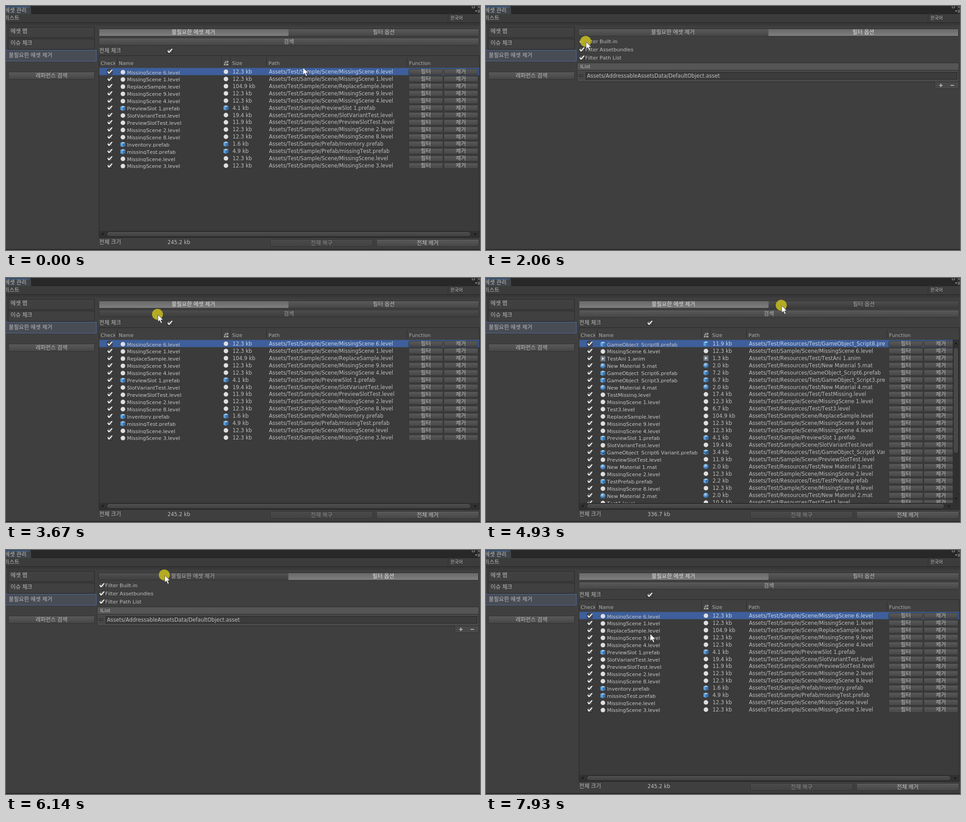
Write an HTML page that moves like this. It is 1042 px wide and 538 px high and loops after 8000 ms.

```html
<!DOCTYPE html>
<html lang="ko">
<head>
<meta charset="utf-8">
<title>Asset cleaner</title>
<style>
html, body { margin: 0; width: 100%; height: 100%; overflow: hidden; background: #3f3f3f; }
svg { display: block; }
text { font: 11.4px "DejaVu Sans", sans-serif; font-kerning: none; fill: #bdbdbd; white-space: pre; }
.ko { font: 12.1px "Noto Sans CJK KR", "Noto Sans CJK", sans-serif; }
.mid { text-anchor: middle; }
.name { font-size: 11.2px; fill: #c6c6c6; }
.head { font-size: 11px; fill: #b0b0b0; }
.opt { font-size: 11.1px; }
.small { font-size: 9.8px; }
.sel { fill: #cbd6ea; }
.on { fill: #e2e2e2; }
.dim { fill: #848484; }
.track { animation: 8s step-end infinite; }
</style>
</head>
<body>
<svg id="stage" width="1042" height="538" viewBox="0 0 1042 538">
  <defs>
    <linearGradient id="btn" x2="0" y2="1"><stop stop-color="#5a5a5a"/><stop offset="1" stop-color="#464646"/></linearGradient>
    <linearGradient id="act" x2="0" y2="1"><stop stop-color="#696969"/><stop offset="1" stop-color="#7e7e7e"/></linearGradient>
    <linearGradient id="off" x2="0" y2="1"><stop stop-color="#4a4a4a"/><stop offset="1" stop-color="#424242"/></linearGradient>
    <linearGradient id="bar" x2="0" y2="1"><stop stop-color="#505050"/><stop offset="1" stop-color="#404040"/></linearGradient>
    <radialGradient id="ball" cx=".4" cy=".3" r=".7"><stop stop-color="#b9dcf5"/><stop offset=".5" stop-color="#5b93c8"/><stop offset="1" stop-color="#2c5a8c"/></radialGradient>
    <g id="tick">
      <rect x="-5.5" y="-5.5" width="11" height="11" rx="1.5" fill="#505050" stroke="#282828"/>
      <path d="M-4.5 -.5L-1.5 3L5.5 -4.5" fill="none" stroke="#f0f0f0" stroke-width="2.3"/>
    </g>
    <circle id="s" r="5" fill="#dedede"/>
    <g id="p">
      <path d="M-5.5 -3.5L0 -5.5L5.5 -3.5L0 -1.5z" fill="#a3d0f2"/>
      <path d="M-5.5 -3.5L0 -1.5V6L-5.5 3.5z" fill="#5f9fd8"/>
      <path d="M5.5 -3.5L0 -1.5V6L5.5 3.5z" fill="#3a74b2"/>
    </g>
    <g id="v"><use href="#p"/><path d="M-5.5 -1L0 3L5.5 -1" fill="none" stroke="#26496f" stroke-width="1.6"/></g>
    <circle id="m" r="6" fill="url(#ball)"/>
    <g id="a"><rect x="-5.5" y="-6" width="11" height="12" fill="#777f88" stroke="#4e545a"/><path d="M-2 -3L3 0L-2 3z" fill="#eee"/></g>
  </defs>
</svg>
<script>
const LOOP = 8000;
const EXT = { s: 'level', p: 'prefab', v: 'prefab', m: 'mat', a: 'anim' };
const DIR = { S: 'Sample/Scene/', s: 'Sample/', P: 'Sample/Prefab/', R: 'Resources/Test/', r: 'Resources/' };

// kind + folder, name, size
const SHORT = `sS,MissingScene 6,12.3;sS,MissingScene 1,12.3;sS,ReplaceSample,104.9;sS,MissingScene 9,12.3;
sS,MissingScene 4,12.3;ps,PreviewSlot 1,4.1;sS,SlotVariantTest,19.4;sS,PreviewSlotTest,11.9;sS,MissingScene 2,12.3;
sS,MissingScene 8,12.3;pP,Inventory,1.6;pP,missingTest,4.9;sS,MissingScene,12.3;sS,MissingScene 3,12.3`;
const LONG = `pR,GameObject_Script8,11.9;sS,MissingScene 6,12.3;aR,TestAni 1,1.3;mR,New Material 5,2.0;
pr,GameObject_Script6,7.2;pR,GameObject_Script3,6.7;mR,New Material 4,2.0;sR,TestMissing,17.4;sS,MissingScene 1,12.3;
sR,Test3,6.7;sS,ReplaceSample,104.9;sS,MissingScene 9,12.3;sS,MissingScene 4,12.3;ps,PreviewSlot 1,4.1;
sS,SlotVariantTest,19.4;vR,GameObject_Script6 Variant,3.4;sS,PreviewSlotTest,11.9;mR,New Material 1,2.0;
sS,MissingScene 2,12.3;pR,TestPrefab,2.2;sS,MissingScene 8,12.3;mR,New Material 2,2.0;sR,Test1,10.5`;

const text = (x, y, s, cls = '') => `<text x="${x}" y="${y}" class="${cls}">${s}</text>`;
const ko = (x, y, s, cls = '') => text(x, y, s, 'ko ' + cls);
const rect = (x, y, w, h, fill, more = '') => `<rect x="${x}" y="${y}" width="${w}" height="${h}" fill="${fill}" ${more}/>`;
const box = (x, y, w, h, fill, line, r = 0) => rect(x + .5, y + .5, w - 1, h - 1, fill, `stroke="${line}" rx="${r}"`);
const use = (id, x, y) => `<use href="#${id}" x="${x}" y="${y}"/>`;
const path = (d, more) => `<path d="${d}" ${more}/>`;
const clip = (x, y, w, h, body) => `<svg x="${x}" y="${y}" width="${w}" height="${h}" viewBox="${x} ${y} ${w} ${h}">${body}</svg>`;
const group = (id, body) => `<g id="${id}" class="track">${body}</g>`;
const button = (x, y, w, h, label, fill = 'url(#btn)', cls = '') =>
  box(x, y, w, h, fill, '#323232', 2) + ko(x + w / 2, y + h / 2 + 4, label, 'mid ' + cls);

function chrome() {
  return rect(0, 0, 1042, 538, '#3f3f3f')
    + rect(0, 0, 1042, 18, '#282828')
    + path('M0 1H52L55 4V18H0z', 'fill="#41454a"') + rect(0, 1, 53, 1.5, '#3b70ad')
    + ko(-3, 14, '에셋 관리')
    + rect(0, 18, 1042, 18, '#3c3c3c') + rect(0, 36, 1042, 1.5, '#262626') + rect(0, 38, 1042, 5, '#383838')
    + ko(-4, 31, '리스트')
    + rect(971, 18, 1, 18, '#2d2d2d') + ko(977, 30, '한국어', 'small')
    + path('M1025 0V4H1030V0M1037 0L1042 5M1042 0L1037 5M1037 9H1042M1037 11.5H1042M1037 14H1042', 'fill="none" stroke="#aaa"')
    + path('M1031 10H1036L1033.5 13z', 'fill="#aaa"')
    + box(4, 46, 191, 24, '#404040', '#262626') + ko(10, 60, '에셋 맵')
    + box(4, 72, 191, 24, '#404040', '#262626') + ko(10, 86, '이슈 체크')
    + box(-1, 97, 200, 25, '#474c55', '#4d6a9c') + ko(6, 113, '불필요한 에셋 제거')
    + button(5, 145, 190, 17, '레퍼런스 검색')
    + rect(0, 536, 1042, 2, '#2b2626');
}

function tabs(x, active) {
  const cls = i => 'mid ' + (i === active ? 'on' : '');
  return box(x, 50, 836, 17, 'url(#btn)', '#323232', 2)
    + rect(x + 1 + active * 417, 51, active ? 417 : 416, 15, 'url(#act)')
    + ko(x + 208, 62.3, '불필요한 에셋 제거', cls(0)) + ko(x + 626.5, 62.3, '필터 옵션', cls(1));
}

function rows(data, right) {
  return data.split(';').map((line, i) => {
    const [key, name, size] = line.trim().split(',');
    const file = name + '.' + EXT[key[0]];
    const y = 145 + i * 15.92, cls = i ? '' : 'sel';
    return (i ? '' : rect(205, 136.5, right - 205, 16, '#3e5f9b'))
      + use('tick', 228, y)
      + use(key[0], 257, y + 1) + clip(264, y - 7, 208, 14, text(266, y + 5.5, file, 'name'))
      + use(key[0], 483.5, y)
      + text(498, y + 4, size + ' kb', cls)
      + clip(578, y - 8, 299, 16, text(578, y + 4, 'Assets/Test/' + DIR[key[1]] + file, cls))
      + button(885, y - 6.5, 76, 13.5, '필터') + button(962, y - 6.5, 76, 13.5, '제거');
  }).join('');
}

function list(id, data, right, total) {
  const tall = right < 1040;
  return group(id, clip(204, 136, right - 204, 360, rows(data, right))
    + rect(205, 496, 835, 14, '#303030')
    + box(221, 497, right - 239, 12, 'url(#bar)', '#252525', 6)
    + path(`M214 500V506L210 503zM${right - 10} 500V506L${right - 6} 503z`, 'fill="#161616"')
    + (tall ? rect(1026, 136, 14, 360, '#303030') + box(1027, 153, 12, 234, '#484848', '#252525', 6)
      + path('M1030 146H1036L1033 142zM1030 485H1036L1033 489z', 'fill="#161616"') : '')
    + text(355, 525, total + ' kb'));
}

function removeView() {
  const lines = [244, 473, 492, 572, 881].map(x => rect(x, 113, 1, 20, '#2a2a2a')).join('');
  return group('remove', tabs(204, 0)
    + group('pressRight', rect(622, 51, 417, 15, '#000', 'opacity=".14"'))
    + button(204, 70, 836, 17, '검색')
    + group('pressSearch', rect(205, 71, 834, 15, '#000', 'opacity=".14"'))
    + ko(205, 103, '전체 체크') + use('tick', 360, 99)
    + box(204, 109, 837, 402, '#3b3b3b', '#272727') + rect(205, 110, 835, 26, '#404040') + lines
    + clip(206, 115, 34, 20, text(208, 130, 'Check', 'head'))
    + text(248, 130, 'Name', 'head') + text(497, 130, 'Size', 'head')
    + text(577, 130, 'Path', 'head') + text(886, 130, 'Function', 'head')
    + path('M479 126L484 120V126zM485 121H489V125H485z', 'fill="#999"')
    + '<circle cx="481" cy="129" r="2.2" fill="#999"/>' + rect(484, 127, 5, 4, '#999')
    + list('short', SHORT, 1040, '245.2') + list('long', LONG, 1026, '336.7')
    + ko(205, 525, '전체 크기')
    + button(581, 514, 226, 17, '전체 복구', 'url(#off)', 'dim') + button(814, 514, 226, 17, '전체 제거'));
}

function filterView() {
  const labels = ['Filter Built-in', 'Filter Assetbundles', 'Filter Path List'];
  return group('filter', tabs(203, 1)
    + group('pressLeft', rect(204, 51, 416, 15, '#000', 'opacity=".1"'))
    + labels.map((s, i) => use('tick', 210.5, 78 + i * 18) + text(218, 82 + i * 18, s, 'opt')).join('')
    + group('empty', box(204.5, 72, 12, 12, '#505050', '#282828', 1.5))
    + box(200, 125, 840, 17, '#555', '#2c2c2c', 2) + text(207, 137, 'IList', 'opt')
    + box(200, 141, 840, 27, '#484848', '#2c2c2c', 2)
    + path('M204 151.5H214M204 155.5H214', 'stroke="#1e1e1e" stroke-width="1.2"')
    + box(219, 146, 817, 16, '#3c3c3c', '#242424') + text(222, 158, 'Assets/AddressableAssetsData/DefaultObject.asset')
    + box(986, 167, 54, 16, '#484848', '#303030', 2)
    + path('M996 175H1004M1000 171V179M1021 175H1029', 'stroke="#ccc" stroke-width="1.5"'));
}

const pointer = `<g id="pointer" class="track">
  ${group('click', '<circle cx="-1" cy="-1" r="12" fill="#bab123" opacity=".95"/>')}
  ${path('M0 0V15.5L3.7 12.2L6.6 18.8L9.2 17.7L6.4 11.3H11.4z', 'fill="#fff" stroke="#222" stroke-width=".7"')}
</g>`;

document.getElementById('stage').insertAdjacentHTML('beforeend', chrome() + removeView() + filterView() + pointer);

const sheet = document.head.appendChild(document.createElement('style'));
const pct = ms => (ms / LOOP * 100).toFixed(4) + '%';
const addTrack = (id, frames) => {
  sheet.append(`@keyframes ${id} { ${frames} } #${id} { animation-name: ${id}; }\n`);
};

// Visible during the given [from, to] spans only.
function show(id, ...spans) {
  const keys = new Map([[0, 0], [LOOP, 0]]);
  for (const [from, to] of spans) {
    keys.set(to, 0);
    keys.set(from, 1);
  }
  addTrack(id, [...keys].sort((a, b) => a[0] - b[0])
    .map(([ms, v]) => `${pct(ms)} { opacity: ${v} }`).join(' '));
}

// ms, x, y and the number of jumps towards the next point
function move(id, points) {
  addTrack(id, points.map(([ms, x, y, n]) =>
    `${pct(ms)} { transform: translate(${x}px, ${y}px); animation-timing-function: ${n ? `steps(${n}, start)` : 'step-end'} }`).join(' '));
}

show('remove', [0, 970], [2640, 4990], [6230, LOOP]);
show('filter', [970, 2640], [4990, 6230]);
show('short', [0, 3830], [7300, LOOP]);
show('long', [3830, 7300]);
show('empty', [2120, 5930]);
show('click', [910, 970], [2060, 2120], [2580, 2640], [3670, 3740], [4930, 4990], [5780, 5930], [6130, 6230], [7150, 7230]);
show('pressRight', [910, 970], [4930, 4990]);
show('pressLeft', [2580, 2640], [6130, 6230]);
show('pressSearch', [3670, 3830], [7150, 7300]);

move('pointer', [
  [0, 653, 136], [310, 653, 136, 7], [830, 737, 58], [910, 737, 56],
  [1270, 737, 56, 8], [1880, 220, 78], [2060, 220, 79], [2280, 220, 78, 3], [2500, 261, 55], [2580, 261, 53],
  [3040, 261, 53, 3], [3310, 335, 83], [3430, 335, 82], [3520, 334, 81],
  [4380, 334, 81, 5], [4750, 650, 61], [5080, 650, 61, 9], [5765, 289, 76], [5780, 217, 78],
  [5930, 217, 78, 4], [6200, 349, 56], [6540, 349, 56, 6], [7000, 493, 85], [7080, 494, 82],
  [7540, 494, 82, 6], [LOOP, 361, 185]
]);
</script>
</body>
</html>
```
